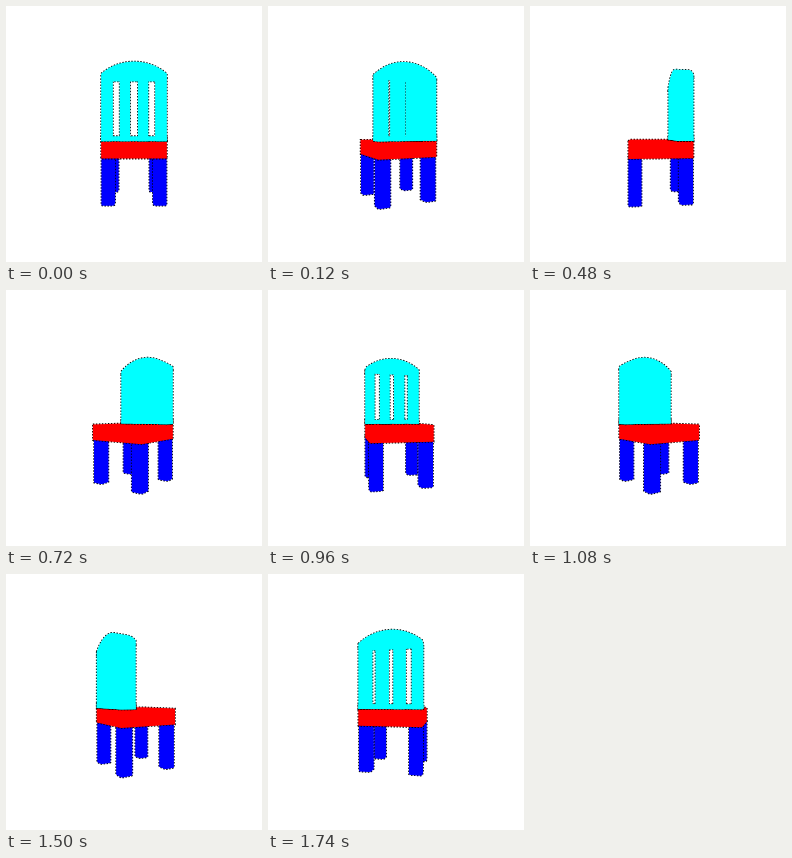
An HTML page with a canvas that plays this animation: 256 by 256 pixels, repeating every 1800 ms.

```html
<!DOCTYPE html>
<html lang="en">
<head>
<meta charset="utf-8">
<title>Turning chair</title>
<style>
  html, body { margin: 0; width: 100%; height: 100%; overflow: hidden; background: #fff; }
  canvas { display: block; }
</style>
</head>
<body>
<canvas id="stage" width="256" height="256"></canvas>
<script>
const ctx = document.getElementById('stage').getContext('2d');
const CAMERA = 220, HALF = 28.6, THICK = 13.8;
const BAR = 8.9, GAP = 7.2, GAP_TOP = -49, SEAT_TOP = 6.2;
const STEP_MS = 60, STEPS = 30;

// Upright prism: a floor outline of [x, z] between two heights
const prism = (outline, top, bottom) =>
  outline.flatMap(([x, z]) => [[x, top, z], [x, bottom, z]]);

const box = (x0, x1, top, bottom, z0, z1) =>
  prism([[x0, z0], [x1, z0], [x1, z1], [x0, z1]], top, bottom);

const backBox = (x0, x1, top, bottom) =>
  box(x0, x1, top, bottom, -HALF, THICK - HALF);

function leg(sx, sz) {
  const r = 5.7, c = 4.1, m = HALF - r;
  const outline = [];
  for (const a of [-1, 1]) for (const b of [-1, 1])
    outline.push([sx * m + a * r, sz * m + b * c], [sx * m + a * c, sz * m + b * r]);
  return prism(outline, 20, 62.4);
}

function arch() {
  const radius = 44.2, points = [];
  for (let i = -8; i <= 8; i++) {
    const x = HALF * i / 8;
    const y = -18.9 - Math.sqrt(radius * radius - x * x);
    for (const z of [-HALF, THICK - HALF]) points.push([x, y, z], [x, GAP_TOP, z]);
  }
  return points;
}

const legs = [[-1, -1], [1, -1], [-1, 1], [1, 1]].map(([sx, sz]) => leg(sx, sz));
const seat = box(-HALF, HALF, SEAT_TOP, 21.4, -HALF, HALF);
const bars = [0, 1, 2, 3].map(i => {
  const x = -HALF + i * (BAR + GAP);
  return backBox(x, x + BAR, GAP_TOP - 0.5, SEAT_TOP);
});
const back = [arch(), backBox(-HALF, HALF, 2, SEAT_TOP), ...bars];

function project([x, y, z], angle) {
  const c = Math.cos(angle), s = Math.sin(angle);
  const depth = x * s + z * c;
  const k = CAMERA / (CAMERA + depth);
  return [128 + (x * c - z * s) * k, 128 + y * k, depth];
}

// Convex hull by monotone chain
function hull(points) {
  const sorted = [...points].sort((a, b) => a[0] - b[0] || a[1] - b[1]);
  const chain = list => {
    const out = [];
    for (const p of list) {
      while (out.length > 1) {
        const [a, b] = out.slice(-2);
        if ((b[0] - a[0]) * (p[1] - a[1]) - (b[1] - a[1]) * (p[0] - a[0]) > 0) break;
        out.pop();
      }
      out.push(p);
    }
    return out.slice(0, -1);
  };
  return [...chain(sorted), ...chain(sorted.reverse())];
}

function shape(points) {
  const path = new Path2D();
  hull(points).forEach(([x, y]) => path.lineTo(x, y));
  path.closePath();
  return path;
}

// Outlines go under the fills, so only the outer rim stays visible
function paint(parts, colour) {
  const paths = parts.map(shape);
  ctx.fillStyle = colour;
  paths.forEach(p => ctx.stroke(p));
  paths.forEach(p => ctx.fill(p));
}

function draw(angle) {
  const turn = part => part.map(p => project(p, angle));
  const depth = part => part.reduce((sum, p) => sum + p[2], 0);
  ctx.fillStyle = '#fff';
  ctx.fillRect(0, 0, 256, 256);
  ctx.strokeStyle = '#000';
  ctx.lineWidth = 1.6;
  ctx.setLineDash([1.5, 1.5]);
  legs.map(turn).sort((a, b) => depth(b) - depth(a)).forEach(l => paint([l], '#00f'));
  paint([turn(seat)], '#f00');
  paint(back.map(turn), '#0ff');
}

function tick() {
  const step = Math.floor(performance.now() / STEP_MS) % STEPS;
  draw(step / STEPS * 2 * Math.PI);
  requestAnimationFrame(tick);
}
tick();
</script>
</body>
</html>
```
